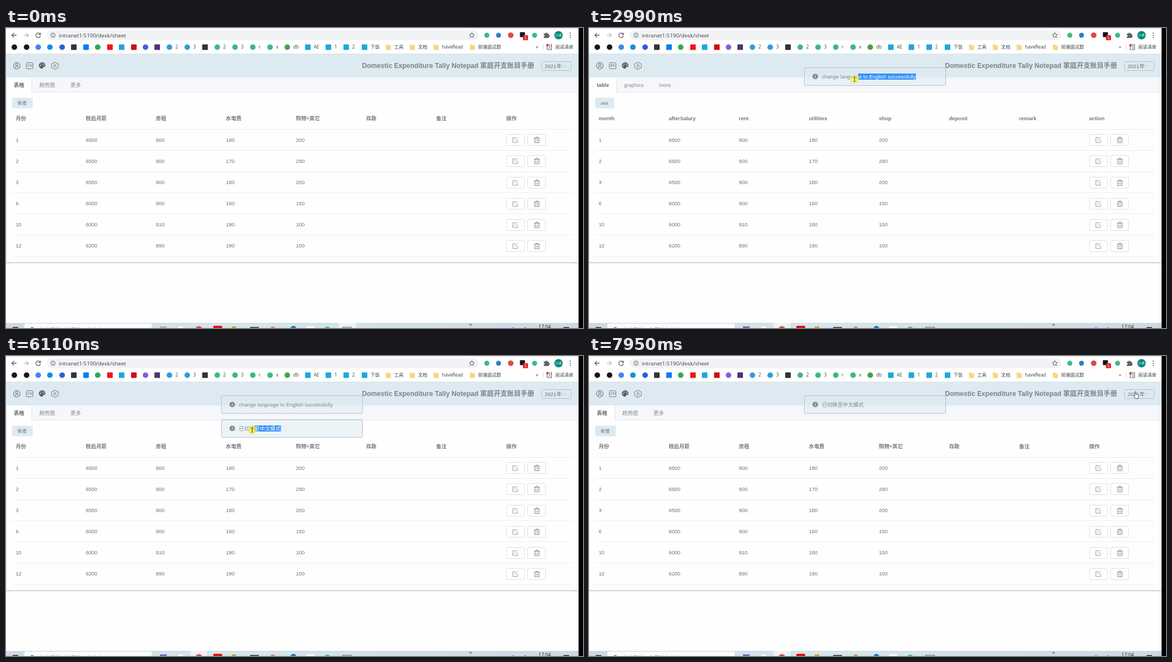
Write an HTML page that moves like this. It is 1038 by 540 pixels and loops after 8 s.

```html
<!DOCTYPE html>
<html lang="zh">
<head>
<meta charset="utf-8">
<style>
html, body { margin: 0; width: 100%; height: 100%; overflow: hidden; background: #fefefe; }
svg { display: block; }
text { font-family: "Liberation Sans", "Noto Sans CJK SC", "Noto Sans CJK", sans-serif; white-space: pre; }
.ui { font-family: "Open Sans", "Noto Sans CJK SC", "Noto Sans CJK", sans-serif; }
.b { font-weight: bold; }
</style>
</head>
<body>
<svg id="stage" width="1038" height="540" viewBox="0 0 1038 540"></svg>
<script>
const LOOP = 8000;
const GREY = '#6c6f74', DARK = '#5f6368', TINT = '#ddeaf1';

// y is the middle of the line; the baseline sits on a whole pixel
const text = (x, y, s, size = 9.38, fill = GREY, more = '') =>
  `<text x="${x}" y="${Math.round(y + size * 0.36)}" font-size="${size}" fill="${fill}" ${more}>${s}</text>`;
const rect = (x, y, w, h, fill, more = '') =>
  `<rect x="${x}" y="${y}" width="${w}" height="${h}" fill="${fill}" ${more}/>`;
const disc = (x, y, r, fill, more = '') => `<circle cx="${x}" cy="${y}" r="${r}" fill="${fill}" ${more}/>`;
const line = (d, stroke, width = 1, more = '') =>
  `<path d="${d}" fill="none" stroke="${stroke}" stroke-width="${width}" ${more}/>`;
const square = (x, y, size, fill) => rect(x - size / 2, y - size / 2, size, size, fill, 'rx="1"');
const at = (x, y, content) => `<g transform="translate(${x} ${y})">${content}</g>`;

function toolbar() {
  const ui = 'class="ui"';
  let s = rect(0, 0, 1030, 47, '#fff') + rect(0, 0, 1030, 1, '#dedfe1') + rect(0, 46, 1030, 1, '#e2e4e6');
  s += line('M19 13H10.5M14.5 9L10.5 13L14.5 17', DARK, 1.3);
  s += line('M32 13H40.5M36.5 9L40.5 13L36.5 17', '#babcbe', 1.3);
  s += line('M61 10.2A4.2 4.2 0 1 0 62 14', DARK, 1.3) + '<path d="M62.5 8v4.5h-4.5z" fill="#5f6368"/>';
  s += rect(73, 4, 777, 18, '#f1f3f4', 'rx="9"');
  s += disc(84.5, 13, 3.9, 'none', `stroke="${DARK}"`) + rect(84, 12.3, 1, 3, DARK) + rect(84, 10.5, 1, 1, DARK);
  s += text(95, 13, 'intranet1:5190/desk/sheet', 9.85, '#3c4043', ui);
  s += line('M838 8.2l1.4 3.1 3.4.3-2.6 2.3.8 3.3-3-1.8-3 1.8.8-3.3-2.6-2.3 3.4-.3z', DARK);
  s += disc(865, 13, 4.5, '#41b883') + disc(886, 13, 4.5, '#2f7fc8') + disc(908, 13, 5, '#e0484a');
  s += square(929, 12, 9, '#151515') + rect(930, 13, 9, 9, '#e0242b', 'rx="1.5"') + text(934.5, 17.5, '1', 7, '#fff', 'text-anchor="middle"');
  s += disc(951, 13, 4.5, '#41b883');
  s += '<path d="M967.5 10h2.8a1.7 1.7 0 0 1 3.4 0h2.8v2.8a1.7 1.7 0 0 1 0 3.4v1.8h-9v-2.3a1.6 1.6 0 0 0 0-3.2z" fill="#5f6368"/>';
  s += disc(994, 13, 7.6, '#00897b') + text(994, 13, '小禾', 6, '#fff', 'text-anchor="middle"');
  for (const y of [9, 13, 17]) s += disc(1015, y, 1.1, DARK);

  const marks = [
    [15, '#181818'], [37, '#181818'], [58, '#4285f4'], [79, '#168fe0'], [101, '#2d5fdc'], [122, '#333', '', 1],
    [144, '#0b7cf4', '', 1], [165, '#34a853'], [187, '#f01818', '', 1], [208, '#22a6df', '', 1], [230, '#cb1010', '', 1],
    [272, '#4b3572', '', 1], [294, '#2d9fdc', '2'], [326, '#2d9fdc', '3'], [358, '#333', '', 1],
    [380, '#41b883', '2'], [412, '#41b883', '3'], [444, '#41b883', 'r'], [475, '#41b883', 'x'], [506, '#46a24a', 'db'],
    [543, '#22a6df', 'AE', 1], [580, '#22a6df', '1', 1], [612, '#22a6df', '2', 1], [645, '#22a6df', '下饭', 1]];
  for (const [x, color, label = '', boxy] of marks) {
    s += boxy ? square(x, 34.5, 10, color) : disc(x, 34.5, 5, color);
    s += text(x + 10.7, 34.5, label, 8.2, '#3c4043', ui);
  }
  for (const [x, label] of [[688, '工具'], [731, '文档'], [774, 'haveRead'], [839, '前端面试题']]) {
    s += `<path d="M${x - 4.5} 30h4l1 1.3h4v8.2h-9z" fill="#f8d775"/>` + text(x + 10.5, 34.5, label, 8.2, '#3c4043', ui);
  }
  s += text(953, 33.5, '»', 9, '#444', ui) + rect(966, 29, 1, 11, '#d5d7d9');
  s += line('M973.5 30h8v9h-8zM976 33h4M976 36h4', DARK, 1.1) + disc(974, 31, 2.2, '#e0353a');
  return s + text(988, 34.5, '阅读清单', 8.2, '#3c4043', ui);
}

function page() {
  let s = rect(0, 47, 1030, 42, TINT);
  s += disc(19.5, 68, 6, 'none', 'stroke="#666"') + disc(19.5, 66, 2.1, 'none', 'stroke="#666"') + line('M15.5 72a4.3 4.3 0 0 1 8 0', '#666');
  s += disc(65, 67.5, 5.8, '#55585c') + rect(66, 70, 5, 4, TINT, 'rx="2"');
  for (const [x, y] of [[62, 68], [63.4, 65], [66.6, 65], [68.5, 67.6]]) s += disc(x, y, 1, TINT);
  s += line('M86 62h4l1.2 1.8 2.3.3 1 3.9-1 3.9-2.3.3-1.2 1.8h-4l-1.2-1.8-2.3-.3-1-3.9 1-3.9 2.3-.3z', '#777') + disc(88, 68, 2.1, 'none', 'stroke="#777"');
  s += text(950, 68, 'Domestic Expenditure Tally Notepad 家庭开支账目手册', 12.1, '#7c8389', 'class="b" text-anchor="end"');
  s += rect(963.5, 60.5, 53, 16, 'none', 'stroke="#b5bec5" rx="2"') + text(969, 69, '2021年', 9.5);
  s += line('M1002 67l3 3.2 3-3.2', '#b0b8bf', 0.9);
  s += rect(0, 89, 1030, 27, '#f5f7fa') + rect(0, 115, 1030, 1, '#e4e7ed');
  s += rect(0, 89, 1, 333, '#dcdfe6') + rect(0, 421, 1030, 1, '#dcdee2') + rect(0, 422, 1030, 1, '#d6d7d9') + rect(0, 423, 1030, 1, '#ececee');
  const rows = ['1 6500 900 180 200', '2 6500 900 170 290', '3 6500 900 180 200',
    '6 6000 900 160 150', '10 6000 910 180 100', '12 6200 890 190 100'];
  s += rect(11, 182, 1008, 1, '#ebeef3');
  rows.forEach((row, i) => {
    const y = 201.3 + i * 38.1;
    row.split(' ').forEach((cell, c) => s += text(17.4 + c * 126.05, y, cell));
    s += rect(11, Math.round(y + 18.7), 1008, 1, '#ebeef3');
    for (const x of [900.5, 938.5]) s += rect(x, Math.round(y) - 9.5, 32, 20, '#fff', 'stroke="#dcdfe6" rx="2"');
    s += at(916, Math.round(y) + 0.5, line('M1-4H-4.2V4.5H4.2V-.5M-1.2 1.2L4.8-4.8', '#8a9aa3'));
    s += at(955, Math.round(y) + 0.5, line('M-5-3H5M-2-3V-5H2V-3M-4-3V5H4V-3M-1.4-.8V3M1.4-.8V3', '#85878a'));
  });
  return s;
}

function labels({ code, tabs, tabX, tabEnd, add, addW, heads }) {
  let s = rect(36.5, 62.5, 12, 11, 'none', 'stroke="#777" rx="2"') + text(42.5, 68, code, 6.3, '#666', 'text-anchor="middle"');
  s += rect(1, 89, tabEnd - 1, 27, '#fefefe') + rect(tabEnd, 89, 1, 27, '#dfe3ea');
  tabs.forEach((tab, i) => s += text(tabX[i], 103, tab, 9.38, i ? '#85888e' : '#64676b', i ? '' : 'class="b"'));
  s += rect(11, 125.5, addW, 19, TINT, 'rx="1"') + text(21, 135, add, 8.04);
  heads.forEach((head, i) => s += text(17.4 + i * 126.05, 163, head, 9.38, '#75787d', 'class="b"'));
  return s;
}

const zh = labels({
  code: 'CN', tabs: ['表格', '趋势图', '更多'], tabX: [14, 60, 116], tabEnd: 46, add: '新增', addW: 37,
  heads: ['月份', '税后月薪', '房租', '水电费', '购物+其它', '存款', '备注', '操作']
});
const en = labels({
  code: 'EN', tabs: ['table', 'graphics', 'more'], tabX: [14, 63, 126], tabEnd: 49, add: 'add', addW: 34.5,
  heads: ['month', 'afterSalary', 'rent', 'utilities', 'shop', 'deposit', 'remark', 'action']
});

function taskbar(t) {
  const early = t < 1550;
  let s = rect(0, 531, 1030, 9, 'url(#bar)') + rect(0, 531, 1030, 1, '#c9d2da');
  s += rect(33, 532, 229, 8, '#fbfcfc') + rect(early ? 598 : 332, 531, early ? 32 : 30, 9, '#edf3f5');
  s += rect(12, 538.5, 10, 2, '#222') + disc(47, 542, 3.2, 'none', 'stroke="#444"');
  s += text(60, 543.5, '在这里输入你要搜索的内容', 9.5, '#777');
  s += rect(277, 537, 12, 3, early ? '#b9aacb' : '#8a63c9') + disc(314, 543, 6, '#fff') + disc(347, 543, 6.5, '#d9504c');
  s += rect(373, 536, 16, 8, '#e80d12', 'rx="2"') + rect(406, 537, 8, 3, '#d9a03c') + rect(439, 538, 16, 2, '#555');
  s += disc(480, 541, 4, '#dd8b72') + disc(517, 541, 5, '#1b7fc4') + rect(540, 537, 14, 3, '#fff') + disc(578, 543, 5.5, '#45b58c');
  s += rect(605.5, 538.5, 16, 4, 'none', 'stroke="#666"') + text(833, 534, '»', 9.5, '#444');
  s += disc(912, 541, 2, '#555') + disc(934, 541, 2, '#555');
  return s + text(958, 538, '17:04', 8.7, '#222', 'class="ui"') + rect(1003, 538.5, 10, 2, '#222') + rect(1027, 531, 1, 9, '#b4c0cb');
}

// time, x, y, and the pointer shape until the next stop
const path = [
  [70, 908, 505, 'arrow'], [400, 908, 505, 'arrow'], [1140, 53, 74, 'arrow'], [1210, 50, 72, 'hand'], [1350, 44, 67, 'hand'],
  [1550, 44, 67, 'arrow'], [1880, 375, 104, 'arrow'], [2340, 612, 93, 'beam'], [2560, 592, 92, 'beam'], [2990, 478, 92, 'beam'],
  [3140, 437, 92, 'beam'], [3340, 405, 92, 'beam'], [3610, 405, 92, 'arrow'], [4370, 44, 67, 'hand'], [4560, 46, 67, 'arrow'],
  [4900, 245, 88, 'arrow'], [5180, 390, 118, 'arrow'], [5250, 406, 122, 'beam'], [5650, 499, 132, 'beam'], [5750, 499, 132, 'beam'],
  [6110, 443, 133, 'beam'], [6460, 420, 133, 'beam'], [6660, 420, 133, 'arrow'], [7060, 738, 128, 'arrow'], [7340, 808, 118, 'arrow'],
  [7470, 808, 118, 'arrow'], [7880, 978, 68, 'hand'], [7950, 983, 64, 'hand'], [8000, 983, 64, 'hand']];
const presses = [[1350, 1550], [2560, 3400], [4370, 4500], [5750, 6560]];

const shapes = {
  arrow: '<path d="M0 0V9.2L2.1 7.3 3.6 10.8 5 10.2 3.5 6.9H6.3z" fill="#fff" stroke="#333" stroke-width=".8"/>',
  beam: line('M-1.8-4Q0-4 0-3Q0-4 1.8-4M0-3V3.4M-1.8 4.4Q0 4.4 0 3.4Q0 4.4 1.8 4.4', '#333', 0.9),
  hand: '<path d="M-1 1Q-1 0 0 0T1 1V4.6L4.8 5.6Q6 6 5.9 7.4L5.2 11.5Q5 12.6 4 12.6H.3L-3 8.2Q-3.2 7-2 7L-1 8z" fill="#fff" stroke="#333" stroke-width=".9"/>'
};

function pointerAt(t) {
  const i = path.findIndex((p, n) => n < path.length - 1 && t < path[n + 1][0]);
  const [t0, x0, y0, shape] = path[i], [t1, x1, y1] = path[i + 1];
  const k = Math.max(0, (t - t0) / (t1 - t0));
  return { x: x0 + (x1 - x0) * k, y: y0 + (y1 - y0) * k, shape };
}

function pointer(t) {
  if (t < 70) return '';
  const { x, y, shape } = pointerAt(t);
  const pressed = presses.some(([from, to]) => t >= from && t < to);
  return (pressed ? disc(x, y, 8, '#f7ee3c', 'opacity=".65"') : '') + at(x, y, shapes[shape]);
}

const ease = p => 1 - (1 - Math.min(1, Math.max(0, p))) ** 2.2;

function toast(id, top, opacity, message, selectFrom) {
  if (opacity <= 0) return '';
  top = Math.round(top);
  const y = top + 16.3;
  let s = rect(387.5, top + 0.5, 254, 32, '#deebf2', 'fill-opacity=".55" stroke="#b5c2cc" rx="2.5"');
  s += disc(407, y, 4.9, '#85888d') + text(407, y, 'i', 7.5, '#fff', 'class="b" font-style="italic" text-anchor="middle"');
  s += text(419, y, message.text, 9.38, '#85888d');
  if (selectFrom < message.end) {
    const box = fill => rect(selectFrom, top + 11, message.end - selectFrom, 11, fill);
    s += `<clipPath id="${id}">${box('#000')}</clipPath>` + box('#3390f8');
    s += text(419, y, message.text, 9.38, '#fff', `clip-path="url(#${id})"`);
  }
  return `<g opacity="${opacity}" clip-path="url(#page)">${s}</g>`;
}

const english = { text: 'change language to English successfully', end: 588 };
const chinese = { text: '已切换至中文模式', end: 494.5 };

// left edge of a selection dragged leftwards, snapped to characters
function selection(t, from, to, clear, step, offset) {
  if (t < from || t >= clear) return Infinity;
  const x = pointerAt(Math.min(t, to)).x + offset;
  return 419 + Math.max(0, Math.round((x - 419) / step)) * step;
}

function toasts(t) {
  const leave = ease((t - 6730) / 220), rise = ease((t - 6740) / 400);
  const top1 = 71 - 32 * (1 - ease((t - 1650) / 400)) - 10 * leave;
  const top2 = 114 - 32 * (1 - ease((t - 4655) / 400)) - 43 * rise;
  return toast('sel1', top1, ease((t - 1650) / 300) - leave, english, selection(t, 2560, 3340, 4430, 4.35, 5)) +
    toast('sel2', top2, ease((t - 4655) / 300), chinese, selection(t, 5750, 6460, 7470, 9.4, 0));
}

const stage = document.getElementById('stage');
stage.innerHTML = `<defs><clipPath id="page">${rect(0, 47, 1030, 484, '#000')}</clipPath>
  <linearGradient id="bar"><stop stop-color="#d0d9e1"/><stop offset=".4" stop-color="#d5e7ea"/><stop offset="1" stop-color="#cfd9e6"/></linearGradient></defs>
  ${rect(0, 0, 1038, 540, '#fefefe')}${toolbar()}${page()}<g id="zh">${zh}</g><g id="en">${en}</g><g id="live"></g>${rect(1030, 0, 8, 540, '#000')}`;
const [zhLayer, enLayer, live] = ['zh', 'en', 'live'].map(id => document.getElementById(id));

function frame() {
  const t = performance.now() % LOOP;
  const isEnglish = t >= 1550 && t < 4430;
  zhLayer.style.display = isEnglish ? 'none' : '';
  enLayer.style.display = isEnglish ? '' : 'none';
  live.innerHTML = disc(251, 34.5, 5, t < 1550 ? '#3f63e0' : '#8a5fd6') + taskbar(t) + toasts(t) + pointer(t);
  requestAnimationFrame(frame);
}
frame();
</script>
</body>
</html>
```
